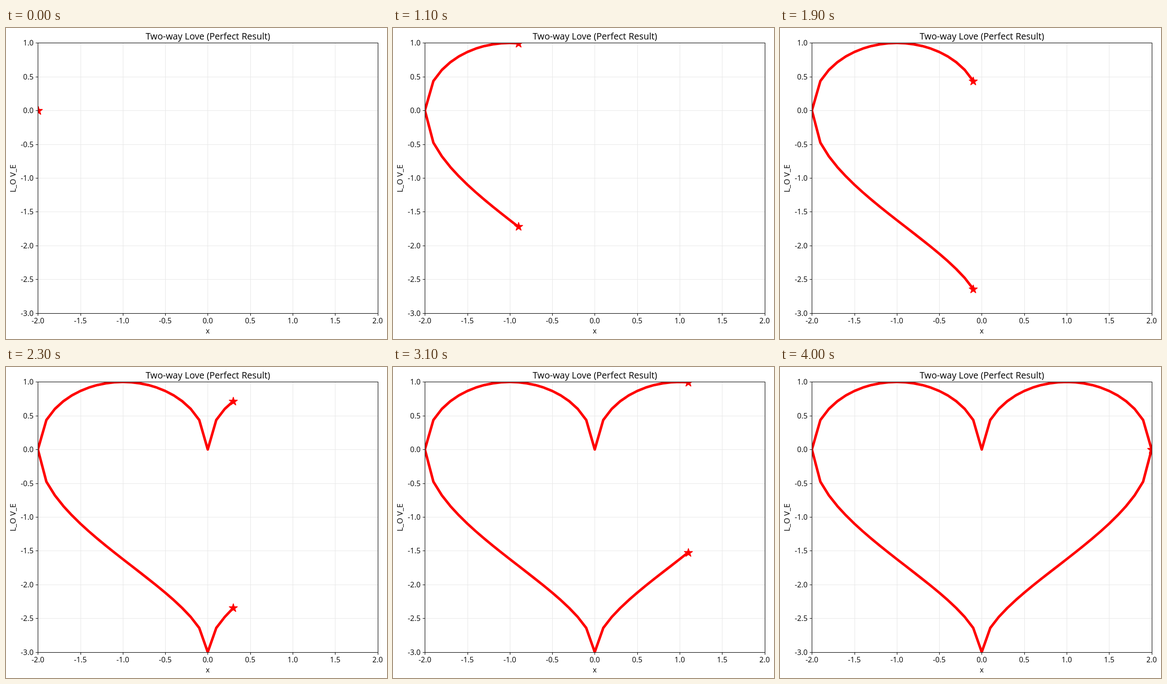
An HTML page that plays this animation: 828x676 px, repeating every 4.1 s.

```html
<!DOCTYPE html>
<html lang="en">
<head>
<meta charset="utf-8">
<title>Two-way Love</title>
<style>
html, body { margin: 0; width: 828px; height: 676px; overflow: hidden; background: #fff; }
svg { display: block; }
text { font-family: "Open Sans", "Noto Sans", sans-serif; font-size: 16px; fill: #000; }
.mid { text-anchor: middle; }
.end { text-anchor: end; }
.grid { stroke: #e7e7e7; stroke-width: 1.11; }
.axis { stroke: #000; stroke-width: 1.11; fill: none; }
.curve { stroke: #f00; stroke-width: 5.56; fill: none; stroke-linejoin: round; stroke-linecap: square; }
.star { fill: #f00; stroke: #f00; stroke-width: 1.39; stroke-linejoin: bevel; }
</style>
</head>
<body>
<svg id="stage" width="828" height="676" viewBox="0 0 828 676">
  <clipPath id="plot"><rect x="69" y="32" width="739" height="588"/></clipPath>
  <g id="grid"></g>
  <g id="data" clip-path="url(#plot)"></g>
  <g id="axes"></g>
</svg>
<script>
const STEP = 100, COUNT = 41;
const $ = id => document.getElementById(id);

function add(parent, tag, attrs, text) {
  const el = document.createElementNS("http://www.w3.org/2000/svg", tag);
  for (const name in attrs) el.setAttribute(name, attrs[name]);
  if (text) el.textContent = text;
  parent.appendChild(el);
  return el;
}

const px = x => 438.45 + x * 184.575;
const py = y => 179.25 - y * 146.8;
const snap = v => Math.round(v) + 0.5;
const starSnap = v => Math.floor(v) + 1;

const upper = x => Math.sqrt(1 - (Math.abs(x) - 1) ** 2);
const lower = x => -3 * Math.sqrt(1 - Math.sqrt(Math.abs(x) / 2));

function starPath(radius) {
  const points = [];
  for (let i = 0; i < 10; i++) {
    const r = i % 2 ? radius * 0.382 : radius;
    const a = i * Math.PI / 5;
    points.push((r * Math.sin(a)).toFixed(2) + " " + (-r * Math.cos(a)).toFixed(2));
  }
  return "M" + points.join("L") + "Z";
}

function drawAxes() {
  const grid = $("grid"), axes = $("axes");
  for (let i = 0; i <= 8; i++) {
    const xv = -2 + i / 2, yv = 1 - i / 2;
    const x = snap(px(xv)), y = snap(py(yv));
    if (i > 0 && i < 8) {
      add(grid, "path", { class: "grid", d: `M${x} 32.5V620.5M69.5 ${y}H808.5` });
    }
    add(axes, "path", { class: "axis", d: `M${x} 620.5V625.4M69.5 ${y}H64.6` });
    add(axes, "text", { class: "mid", x: px(xv), y: 642 }, xv.toFixed(1));
    add(axes, "text", { class: "end", x: 59.8, y: py(yv) + 6 }, yv.toFixed(1));
  }
  add(axes, "rect", { class: "axis", x: 69.5, y: 32.5, width: 739, height: 588 });
  add(axes, "text", { class: "mid", x: 438.8, y: 24.5, style: "font-size:19.65px" },
    "Two-way Love (Perfect Result)");
  add(axes, "text", { class: "mid", x: 438.4, y: 663.5 }, "x");
  add(axes, "text", { class: "mid", transform: "translate(21 327) rotate(-90)", style: "font-size:16.8px" },
    "L_O V_E");
}

drawAxes();

const tracks = [upper, lower].map(f => ({ f, line: add($("data"), "path", { class: "curve" }) }));
for (const track of tracks) {
  track.star = add($("data"), "path", { class: "star", d: starPath(9.72) });
}

function render(time) {
  const last = Math.floor(time / STEP) % COUNT;
  for (const { f, line, star } of tracks) {
    const points = [];
    for (let i = 0; i <= last; i++) {
      const x = (i - 20) / 10;
      points.push(px(x).toFixed(2) + " " + py(f(x)).toFixed(2));
    }
    line.setAttribute("d", last ? "M" + points.join("L") : "");
    const x = (last - 20) / 10;
    star.setAttribute("transform", `translate(${starSnap(px(x))} ${starSnap(py(f(x)))})`);
  }
}

let start = null;
function tick(now) {
  if (start === null) start = now;
  render(now - start);
  requestAnimationFrame(tick);
}
render(0);
requestAnimationFrame(tick);
</script>
</body>
</html>
```
